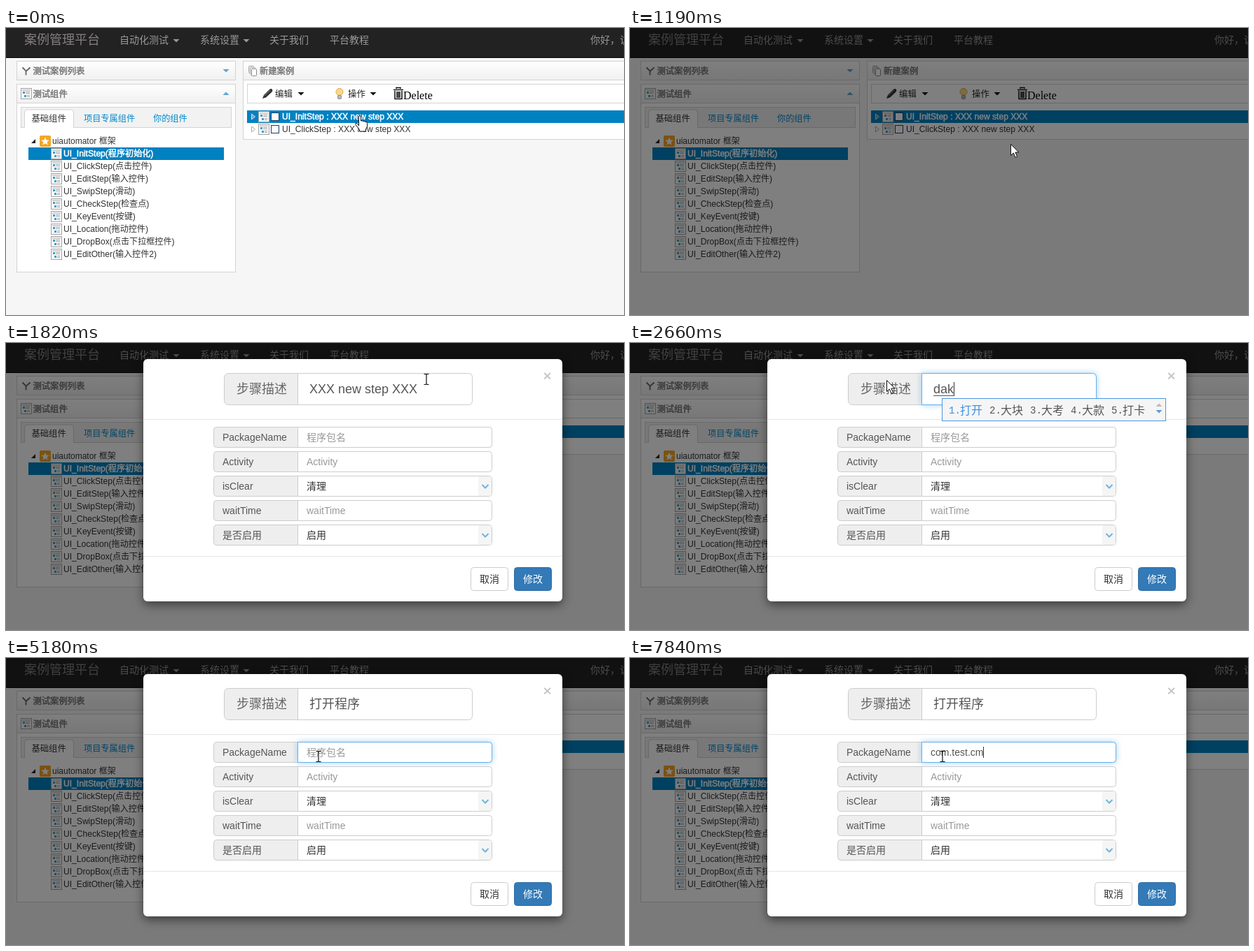
Animation of 882 by 411 pixels, one loop 8000 ms. Source, as an HTML page:

```html
<!DOCTYPE html>
<html lang="zh-CN">
<head>
<meta charset="utf-8">
<style>
  html, body { margin: 0; width: 100%; height: 100%; overflow: hidden; background: #f6f6f6; }
  svg { display: block; }
  text { font-family: "Liberation Sans", "Noto Sans CJK SC", "Noto Sans CJK", sans-serif; white-space: pre; }
  .serif { font-family: "Liberation Serif", serif; }
  .mono { font-family: "Liberation Mono", monospace; }
  .light { font-weight: 300; }
  .heavy { stroke: currentColor; stroke-width: .5; }
  .glow { filter: drop-shadow(0 0 4px rgba(102, 175, 233, .6)); }
  .dialog { filter: drop-shadow(0 5px 7px rgba(0, 0, 0, .5)); }
</style>
</head>
<body>
<svg width="882" height="411" viewBox="0 0 882 411">
  <defs>
    <linearGradient id="header" x2="0" y2="1">
      <stop stop-color="#fff"/><stop offset="1" stop-color="#f0f0f0"/>
    </linearGradient>
  </defs>
  <g id="page"></g>
  <rect id="shade" width="882" height="411"/>
  <g id="modal"><g id="form"></g><g id="live"></g></g>
  <g id="cursor"></g>
</svg>
<script>
const LOOP = 8000, STEP = 70;
const BLUE = '#0081c2', LINE = '#d3d3d3';
const $ = id => document.getElementById(id);

// Drawing helpers
const text = (x, y, s, size = 12, fill = '#333', style = '') =>
  `<text x="${x}" y="${y}" font-size="${size}" fill="${fill}" color="${fill}" class="${style}">${s}</text>`;
const rect = (x, y, w, h, fill, stroke = 'none', r = 0) =>
  `<rect x="${x}" y="${y}" width="${w}" height="${h}" rx="${r}" fill="${fill}" stroke="${stroke}"/>`;
const path = (d, fill, stroke = 'none', more = '') =>
  `<path d="${d}" fill="${fill}" stroke="${stroke}" ${more}/>`;
const arrow = (x, y, fill, up = false) => {
  const s = up ? -1 : 1;
  return path(`M${x - 4.5} ${y - 2 * s}h9l-4.5 ${4.5 * s}z`, fill);
};
const icon = (x, y) =>
  rect(x + .5, y + .5, 15, 15, '#f7f7f7', '#a3a3a3') + rect(x + 2, y + 2, 12, 2, '#d0d0d0') +
  rect(x + 3, y + 5, 3, 3, '#3fa0cc') + rect(x + 5, y + 10, 3, 3, '#3fa0cc') +
  path(`M${x + 7} ${y + 5.5}h6M${x + 7} ${y + 7.5}h6M${x + 9} ${y + 10.5}h4M${x + 9} ${y + 12.5}h4`, 'none', '#aaa');
const title = (x, y, s) => text(x, y, s, 12.3, '#777', 'heavy');

const pen = document.createElement('canvas').getContext('2d');
function widthOf(s, size) {
  pen.font = `${size}px "Liberation Sans", "Noto Sans CJK SC", "Noto Sans CJK", sans-serif`;
  return pen.measureText(s).width;
}

function drawPage() {
  const menus = [[162, '自动化测试', 243], [277, '系统设置', 343], [376, '关于我们'], [462, '平台教程']];
  const nav = rect(0, 0, 882, 42, '#222') + rect(0, 42, 882, 1, '#080808') +
    text(26, 23, '案例管理平台', 18, '#857f80', 'light') +
    menus.map(([x, s, a]) => text(x, 22, s, 14, '#999') + (a ? arrow(a, 18, '#999') : '')).join('') +
    text(834, 22, '你好，访客', 14, '#999');

  const steps = ['InitStep(程序初始化)', 'ClickStep(点击控件)', 'EditStep(输入控件)', 'SwipStep(滑动)',
    'CheckStep(检查点)', 'KeyEvent(按键)', 'Location(拖动控件)', 'DropBox(点击下拉框控件)', 'EditOther(输入控件2)'];
  const left = rect(15.5, 47.5, 312, 27, 'url(#header)', LINE) +
    path('M23.5 56.5l5 5v6M34.5 56.5l-6 5.500', 'none', '#666', 'stroke-width="1.8"') +
    title(38.5, 65.5, '测试案例列表') + arrow(314, 61, '#5ea6d2') +
    rect(15.5, 80.5, 312, 269, '#fff', LINE) + rect(15.5, 80.5, 312, 27, 'url(#header)', LINE) +
    icon(21, 86) + title(38.5, 98.5, '测试组件') + arrow(314, 94, '#5ea6d2', true) +
    rect(21.5, 113.5, 300, 29, '#f2f2f2', LINE) +
    path('M26.5 143v-22q0-4 4-4h62q4 0 4 4v22', '#fff', LINE) +
    text(36.5, 133.5, '基础组件', 12.3) + text(111, 133.5, '项目专属组件', 12.2, '#0088cc') +
    text(210, 133.5, '你的组件', 12.2, '#0088cc') +
    path('M36 165h6v-6z', '#222') + rect(48, 154, 16, 16, '#f5a623', 'none', 2) +
    path('M56 156.5l1.6 4 4.2.2-3.3 2.7 1.1 4.1-3.6-2.3-3.6 2.3 1.1-4.1-3.3-2.7 4.2-.2z', '#fff') +
    text(66, 166, 'uiautomator 框架') + rect(32, 171, 279, 18, BLUE) +
    steps.map((s, i) => icon(64, 172 + 18 * i) +
      text(82, 184 + 18 * i, 'UI_' + s, 12.1, i ? '#333' : '#fff', i ? '' : 'heavy')).join('');

  const row = (y, s, on) => (on ? rect(344, y, 538, 18, BLUE) : '') +
    path(`M350.5 ${y + 5}v8l5-4z`, on ? '#5fa9d0' : '#fff', on ? '#ddd' : '#aaa') + icon(360, y + 1) +
    rect(378.5, y + 3.5, 11, 11, '#fff', '#1c3f66') +
    text(394, y + 13, s, 12.1, on ? '#fff' : '#333', on ? 'heavy' : '');
  const right = rect(338.5, 47.5, 560, 112, '#fff', LINE) + rect(338.5, 47.5, 560, 27, 'url(#header)', LINE) +
    rect(346.5, 54.5, 7, 10, '#e8e8e8', '#aaa', 1) + rect(348.5, 56.5, 7, 10, '#eee', '#aaa', 1) +
    rect(350.5, 58.5, 7, 10, '#fff', '#888', 1) +
    title(362, 65.5, '新建案例') + rect(344.5, 80.5, 550, 27, '#fff', LINE) +
    path('M366 101l2-5 8-8q2-2 4 0 1 2-.5 3.5l-8.5 8z', '#333') + path('M369 97l8-8', 'none', '#7a9a60') +
    text(384, 98.5, '编辑', 12.4, '#222') + arrow(421, 94, '#111') +
    '<circle cx="476" cy="91.5" r="5" fill="#fbd78b" stroke="#dca94c"/>' +
    rect(473.5, 96.5, 5, 5, '#bbb', '#888', 1) +
    text(488, 98.5, '操作', 12.4, '#222') + arrow(524, 94, '#111') +
    path('M553 88.5h14M557 87v-1.5h6v1.5M555 90v11.5h10V90M558 91v9M560 91v9M562 91v9', 'none', '#111', 'stroke-width="1.5"') +
    text(567, 102, 'Delete', 16, '#000', 'serif') +
    row(118, 'UI_InitStep : XXX new step XXX', true) + row(136, 'UI_ClickStep : XXX new step XXX');
  $('page').innerHTML = nav + left + right;
}

// Text input whose left edge joins the label at x = 416.5
const input = (y, right, h, r, focused) => path(
  `M416.5 ${y}H${right - r}q${r} 0 ${r} ${r}v${h - 2 * r}q0 ${r} ${-r} ${r}H416.5z`,
  '#fff', focused ? '#66afe9' : '#ccc', focused ? 'class="glow"' : '');
const titleInput = focused => input(43.5, 665.5, 45, 6, focused);
const packageInput = focused => input(120.5, 693.5, 29, 4, focused);

function drawForm() {
  const fields = [['PackageName'], ['Activity', 'Activity'], ['isClear', '清理', true],
    ['waitTime', 'waitTime'], ['是否启用', '启用', true]];
  const rows = fields.map(([label, value, select], i) => {
    const y = 120.5 + 35 * i;
    return rect(296.5, y, 140, 29, '#eee', '#ccc', 4) + text(309, y + 19.5, label, 14, '#555') +
      input(y, 693.5, 29, 4) + (value ? text(429, y + 19.5, value, 14, select ? '#333' : '#999') : '') +
      (select ? rect(674, y + .5, 19, 28, '#f5f5f5', 'none', 3) +
        path(`M679.5 ${y + 12.5}l4.5 4.5 4.5-4.5`, 'none', '#6fb3e0', 'stroke-width="2"') : '');
  }).join('');
  $('form').innerHTML = `<g class="dialog">${rect(196, 23, 598, 347, '#fff', 'none', 6)}</g>` +
    rect(196, 109, 598, 1, '#e5e5e5') + rect(196, 305, 598, 1, '#e5e5e5') +
    text(766.5, 54, '×', 21, '#c4c4c4', 'heavy') +
    rect(311.5, 43.5, 130, 45, '#eee', '#ccc', 6) + text(329, 72, '步骤描述', 18, '#666', 'light') +
    rows + rect(663.5, 321.5, 53, 33, '#fff', '#ccc', 4) + text(676, 343, '取消', 14) +
    rect(725.5, 321.5, 53, 33, '#337ab7', '#2e6da4', 4) + text(738, 343, '修改', 14, '#fff');
}

// [time, committed text, text being composed, candidates]
const titleKeys = [
  [0, 'XXX new step XXX'],
  [2310, '', 'd', '的 大 到 都 地'], [2380, '', 'da', '大 打 达 答 搭'],
  [2660, '', 'dak', '打开 大块 大考 大款 打卡'], [2730, '', 'daka', '打卡 打开 大咖 大卡 达卡'],
  [2800, '', 'dakai', '打开 大开 搭开 答开 达开'], [2870, '打开'],
  [3010, '打开', 'c', '从 才 次 成 出'], [3080, '打开', 'ch', '吃 出 成 车 长'],
  [3150, '打开', 'che', '车 撤 扯 彻 澈'], [3290, '打开', 'cheng', '成 称 城 呈 撑'],
  [3500, '打开', 'chengx', '程序 成型 成效 诚信 呈现'], [3640, '打开', 'chengxu', '程序 成需 乘需 成序 承续'],
  [3710, '打开程序']
];
// [time, number of characters typed]
const packageName = 'com.test.cm';
const packageKeys = [[0, 0], [5320, 1], [5460, 2], [5600, 3], [6090, 4], [6370, 5], [6440, 6],
  [6650, 7], [6790, 8], [7350, 9], [7490, 10], [7840, 11]];
const cursorKeys = [[0, 505, 125], [140, 505, 125], [210, 637, 170], [420, 637, 170], [700, 506, 127],
  [910, 543, 166], [1470, 543, 166], [1820, 600, 52], [2100, 366, 53], [4060, 366, 53],
  [4270, 344, 76], [4620, 446, 141], [LOOP, 446, 141]];
const FOCUS_TITLE = 1890, FOCUS_PACKAGE = 4690, FIRST_KEY = 2310;

const latest = (keys, t) => keys.findLast(k => k[0] <= t);
const clamp = v => Math.max(0, Math.min(1, v));
const caretOn = elapsed => elapsed % 1000 < 490;

function cursorAt(t) {
  const i = cursorKeys.findIndex(k => k[0] > t), [t0, x0, y0] = cursorKeys[i - 1], [t1, x1, y1] = cursorKeys[i];
  const p = (t - t0) / (t1 - t0);
  return [x0 + (x1 - x0) * p, y0 + (y1 - y0) * p];
}

function popup(x, list) {
  const words = list.split(' '), cell = 26 + 16 * words[0].length, w = 30 + 5 * cell;
  return rect(x + .5, 79.5, w - 1, 32, '#f5f5f5', '#4b96e0') +
    words.map((word, i) => {
      const fill = i ? '#555' : '#3a8ee6', at = x + 10 + cell * i;
      return text(at, 101, i + 1 + '.', 14, fill, 'mono') + text(at + 16, 101.5, word, 16, fill, 'light');
    }).join('') + arrow(x + w - 10, 89, '#bbb', true) + arrow(x + w - 10, 98, '#5a9bd5');
}

function titleField(t, mouseX) {
  const [since, done, draft, list] = latest(titleKeys, t);
  const focused = t >= FOCUS_TITLE && t < FOCUS_PACKAGE;
  const selected = focused && t < FIRST_KEY ? Math.round(16 * clamp((587 - mouseX) / 154)) : 0;
  const plain = done.slice(0, done.length - selected), marked = done.slice(done.length - selected);
  const end = 433 + widthOf(plain, 18);
  let out = titleInput(focused) + text(433, 72, plain, 18, '#555', t < FIRST_KEY ? '' : 'light');
  if (selected) out += rect(end, 56, 587 - end, 21, '#3390ff') + text(end, 72, marked, 18, '#fff');
  const w = draft ? widthOf(draft, 18) : 0;
  if (draft) out += text(end, 72, draft, 18, '#555') + rect(end, 75, w, 1, '#555');
  if (focused && !selected && (draft || caretOn(t - since))) out += rect(Math.round(end + w), 56, 1, 20, '#333');
  return [out, list ? popup(end + 12, list) : ''];
}

function packageField(t) {
  const [since, count] = latest(packageKeys, t), typed = packageName.slice(0, count);
  const focused = t >= FOCUS_PACKAGE;
  const caret = focused && caretOn(t - Math.max(since, FOCUS_PACKAGE));
  return packageInput(focused) +
    (count ? text(429, 140, typed, 14, '#555') : text(429, 140, '程序包名', 14, '#999')) +
    (caret ? rect(Math.round(429 + widthOf(typed, 14)), 127, 1, 16, '#333') : '');
}

const pointers = {
  arrow: path('M.5.5v16l3.8-3.5 2.7 6.3 2.6-1.1-2.7-6.2h5z', '#fff', '#111'),
  beam: path('M-3.5-7.5h2.5l1 1 1-1h2.5M0-6.5v13M-3.5 7.5h2.5l1-1 1 1h2.5', 'none', '#111', 'stroke-width="1.2"'),
  hand: path('M-1.5 15V2q0-1.5 1.5-1.5t1.5 1.5v6q1.5-1 3 .5 1.5-.8 3 .7 3-.5 3 2.3v4.5l-2 4v3h-9v-2.5l-5.5-7q-1-2.5 1.5-2.5z', '#fff', '#111')
};
function pointerKind(t, x, y) {
  if (t < 1050) return x > 344 && y > 118 && y < 154 ? 'hand' : 'arrow';
  const overInput = x > 416 && (y > 43 && y < 89 || y > 120 && y < 150);
  return t > 1500 && overInput ? 'beam' : 'arrow';
}

function draw(t) {
  const [x, y] = cursorAt(t), slide = clamp((t - 1200) / 300);
  $('shade').setAttribute('opacity', .5 * clamp((t - 1050) / 140));
  $('modal').setAttribute('opacity', clamp((t - 1200) / 150));
  $('modal').setAttribute('transform', `translate(0 ${-87 * (1 - slide) ** 2})`);
  const [field, candidates] = titleField(t, x);
  $('live').innerHTML = field + packageField(t) + candidates;
  $('cursor').innerHTML = pointers[pointerKind(t, x, y)];
  $('cursor').setAttribute('transform', `translate(${Math.round(x)} ${Math.round(y)})`);
}

drawPage();
drawForm();
const start = performance.now();
let shown = -1;
function tick() {
  const elapsed = (performance.now() - start) % LOOP, t = Math.floor(elapsed / STEP) * STEP;
  if (t !== shown) draw(shown = t);
  requestAnimationFrame(tick);
}
tick();
</script>
</body>
</html>
```
